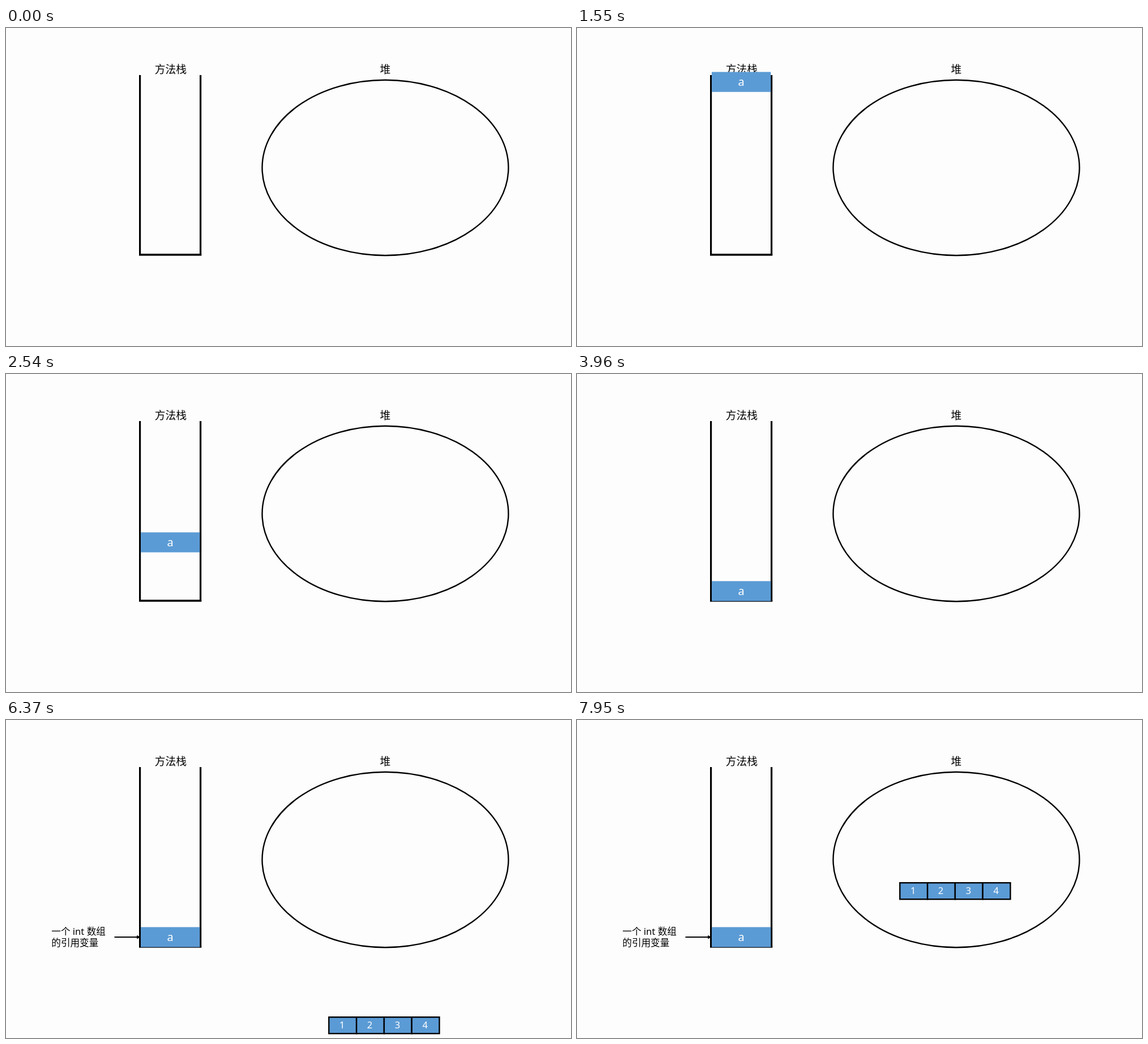
Write an HTML page that moves like this. It is 998x561 px and loops after 8000 ms.

```html
<!DOCTYPE html>
<html lang="zh-CN">
<head>
<meta charset="utf-8">
<title>数组内存示意</title>
<style>
  html, body { margin: 0; width: 100%; height: 100%; overflow: hidden; background: #fdfdfd; }
  svg { display: block; width: 998px; height: 561px; }
  text { font-family: "Noto Sans", "Noto Sans CJK SC", "Noto Sans CJK", sans-serif; }
  .mid { text-anchor: middle; }
  .line { fill: none; stroke: #000; }
  .blue { fill: #5b9bd5; }
  .white { fill: #fff; }
</style>
</head>
<body>
<svg viewBox="0 0 998 561">
  <path class="line" stroke-width="3.2" d="M236.6 83V400H343.6V83" />
  <path class="line" stroke-width="3.2" d="M235 400H345.2" />
  <ellipse class="line" stroke-width="2.4" cx="670" cy="246.5" rx="217.5" ry="154.8" />
  <g class="mid" font-size="18.8">
    <text x="290.8" y="80">方法栈</text>
    <text x="670" y="80">堆</text>
  </g>
  <g id="block">
    <rect class="blue" x="238" y="365.4" width="104.3" height="35.2" />
    <text class="mid white" x="290" y="390" font-size="20">a</text>
  </g>
  <g id="note" font-size="16.6">
    <text x="80.3" y="379">一个 int 数组</text>
    <text x="80.3" y="398.5">的引用变量</text>
    <path class="line" stroke-width="2.2" d="M191.5 383H232" />
    <path d="M231 379.7L238 383L231 386.3Z" />
  </g>
  <g id="array" font-size="16.6"></g>
</svg>
<script>
const LOOP = 8000;
const $ = id => document.getElementById(id);

const cell = 48.8, left = 570.3;
$("array").innerHTML = [1, 2, 3, 4].map((n, i) => {
  const x = left + i * cell;
  return `<rect class="blue" stroke="#000" stroke-width="2.4" x="${x}" y="287.2" width="${cell}" height="29"/>
    <text class="mid white" x="${x + cell / 2 - 0.9}" y="307">${n}</text>`;
}).join("");

// Each part flies in linearly from (dx, dy) to its resting place.
const flights = [
  { el: $("block"), start: 990, end: 2962, dx: 0, dy: -402 },
  { el: $("note"), start: 3972, end: 5221, dx: -238, dy: 0 },
  { el: $("array"), start: 6228, end: 7255, dx: 0, dy: 275 }
];

function draw(t) {
  for (const { el, start, end, dx, dy } of flights) {
    const left = 1 - Math.min(1, Math.max(0, (t - start) / (end - start)));
    el.setAttribute("transform", `translate(${dx * left} ${dy * left})`);
    el.setAttribute("visibility", t < start ? "hidden" : "visible");
  }
}

let origin;
function tick(now) {
  origin ??= now;
  draw((now - origin) % LOOP);
  requestAnimationFrame(tick);
}
draw(0);
requestAnimationFrame(tick);
</script>
</body>
</html>
```
